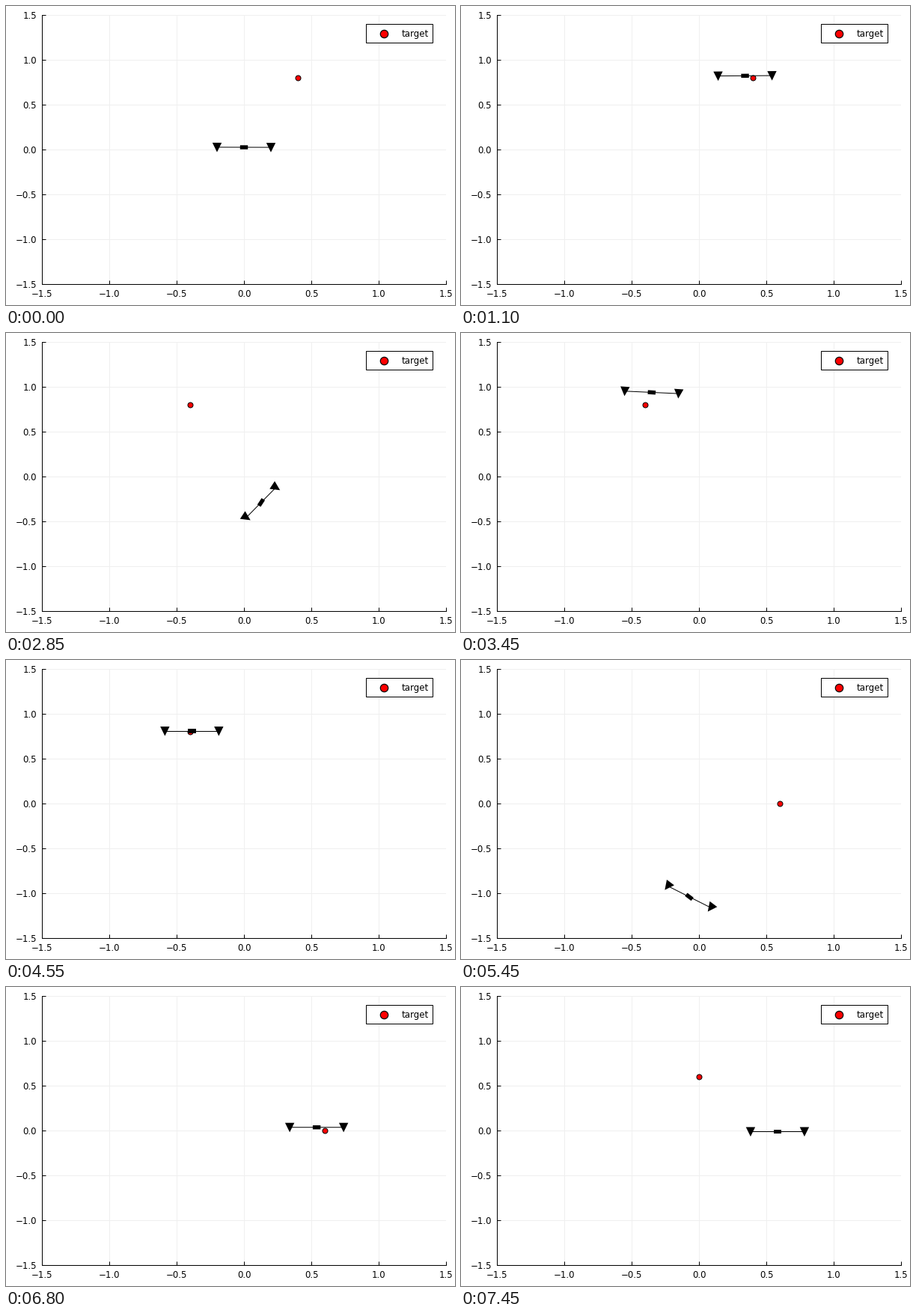
Recreate the animation shown at these times as a matplotlib script. Size 600x400 px, loop 7.5 s.

```python
import numpy as np
import matplotlib.pyplot as plt
from matplotlib.animation import FuncAnimation
from matplotlib.patches import Polygon, Rectangle

FRAMES, STEP_MS = 150, 50
PX = 0.72                       # points per pixel at 100 dpi
SCALE = np.array([180, -120])   # pixels per data unit
ARM = 0.2
TARGETS = [(0.4, 0.8), (-0.4, 0.8), (0.6, 0.0), (0.0, 0.6)]
STARTS = [0, 49, 99]


def glide(steps, values):
    """Cubic Hermite curve that is level at turning points and ends."""
    t, v = np.array(steps, float), np.array(values)
    slope, rise = np.gradient(v, t), np.diff(v)
    slope[1:-1][rise[1:] * rise[:-1] <= 0] = 0
    slope[[0, -1]] = 0

    def at(k):
        k = min(k, t[-1])
        j = min(np.searchsorted(t, k, side="right") - 1, len(t) - 2)
        h = t[j + 1] - t[j]
        u = (k - t[j]) / h
        return (v[j] + rise[j] * u * u * (3 - 2 * u)
                + h * u * (1 - u) * ((1 - u) * slope[j] - u * slope[j + 1]))
    return at


def lean(main, width, sway, middle):
    """Hard tilt into the dive, then a slight one while settling."""
    return lambda k: (main * np.exp(-((k - 7) / width) ** 2)
                      + sway * np.exp(-((k - middle) / 5) ** 2))


# x, y and tilt (positive = right side down) of the flight to each target
first = (glide([0, 4, 11, 16, 22, 32, 48],
               [0, .03, .2, .28, .342, .375, .397]),
         glide([0, 2, 7, 11, 15, 22, 27, 41],
               [.025, .05, -.2, .58, 1.265, .822, .715, .8]),
         lean(.9, 3, -.02, 18))
second = (glide([0, 4, 7, 15, 20, 26, 31, 42, 49],
                [.394, .33, .18, -.233, -.351, -.337, -.353, -.387, -.395]),
          glide([0, 7, 11, 16, 20, 26, 31, 42, 49],
                [.8, -.36, .3, 1.215, .938, .462, .64, .808, .802]),
          lean(-1.1, 3.1, .08, 18))
third = (glide([0, 4, 8, 13, 16, 21, 29, 38, 50],
               [-.39, -.33, -.16, .09, .33, .512, .438, .55, .583]),
         glide([0, 8, 13, 18, 26, 29, 39, 47, 50],
               [.8, -1.28, -.35, .55, -.378, -.605, .11, -.02, -.012]),
         lean(1.35, 3.5, .0375, 26))
LEGS = [first, second, third]

TRIANGLE = np.array([(-6.2, -6), (6.2, -6), (0, 6.6)])
BODY = np.array([(-5.2, -2.7), (5.2, -2.7), (5.2, 2.7), (-5.2, 2.7)])
SHAPES = [TRIANGLE, BODY, TRIANGLE]


def pose(i):
    n = sum(i >= s for s in STARTS) - 1
    return [curve(i - STARTS[n]) for curve in LEGS[n]]


def place(shape, center, tilt):
    """Turn a pixel shape clockwise and move it to a data point."""
    c, s = np.cos(tilt), np.sin(tilt)
    return center + shape @ np.array([(c, s), (-s, c)]) / SCALE


def to_data(px, py):
    return (px - 318) / 180, (192 - py) / 120


plt.rcParams["font.family"] = "DejaVu Sans"
FONT = 11.7 * PX

fig = plt.figure(figsize=(6, 4), dpi=100, facecolor="white")
ax = fig.add_axes([48 / 600, 28 / 400, 540 / 600, 360 / 400])
ax.set(xlim=(-1.5, 1.5), ylim=(-1.5, 1.5))
ticks = np.arange(-1.5, 1.6, 0.5)
ax.set_xticks(ticks)
ax.set_yticks(ticks)
ax.tick_params(direction="in", length=5 * PX, width=PX, labelsize=FONT)
ax.tick_params(axis="x", pad=6.6 * PX)
ax.tick_params(axis="y", pad=7 * PX)
ax.grid(color="#efefef", linewidth=PX)
ax.set_axisbelow(True)
for side, spine in ax.spines.items():
    spine.set_linewidth(PX)
    spine.set_visible(side in ("left", "bottom"))


def dot(x, y, size, edge, z):
    return ax.plot([x], [y], "o", color="#ff0000", markeredgecolor="black",
                   markersize=size * PX, markeredgewidth=edge * PX, zorder=z)[0]


# Legend
left, bottom = to_data(481, 49)
ax.add_patch(Rectangle((left, bottom), 89 / 180, 25 / 120, facecolor="white",
                       edgecolor="black", linewidth=PX, zorder=6))
dot(*to_data(505, 37), 10.4, 1.2, 7)
ax.text(*to_data(528.5, 41), "target", fontsize=FONT, zorder=7)

target = dot(*TARGETS[0], 7, 1, 3)
beam, = ax.plot([], [], color="black", linewidth=PX, zorder=4)
parts = [Polygon(shape, closed=True, facecolor="black", linewidth=0, zorder=5)
         for shape in SHAPES]
for part in parts:
    ax.add_patch(part)


def draw(i):
    x, y, tilt = pose(i)
    center = np.array([x, y])
    arm = ARM * np.array([np.cos(tilt), -np.sin(tilt)])
    spots = np.array([center - arm, center, center + arm])
    beam.set_data(spots[:, 0], spots[:, 1])
    for part, shape, spot in zip(parts, SHAPES, spots):
        part.set_xy(place(shape, spot, tilt))
    tx, ty = TARGETS[(i + 1) // 50]
    target.set_data([tx], [ty])
    return [target, beam, *parts]


anim = FuncAnimation(fig, draw, frames=FRAMES, interval=STEP_MS,
                     repeat=True, repeat_delay=0, blit=False)
plt.show()
```
